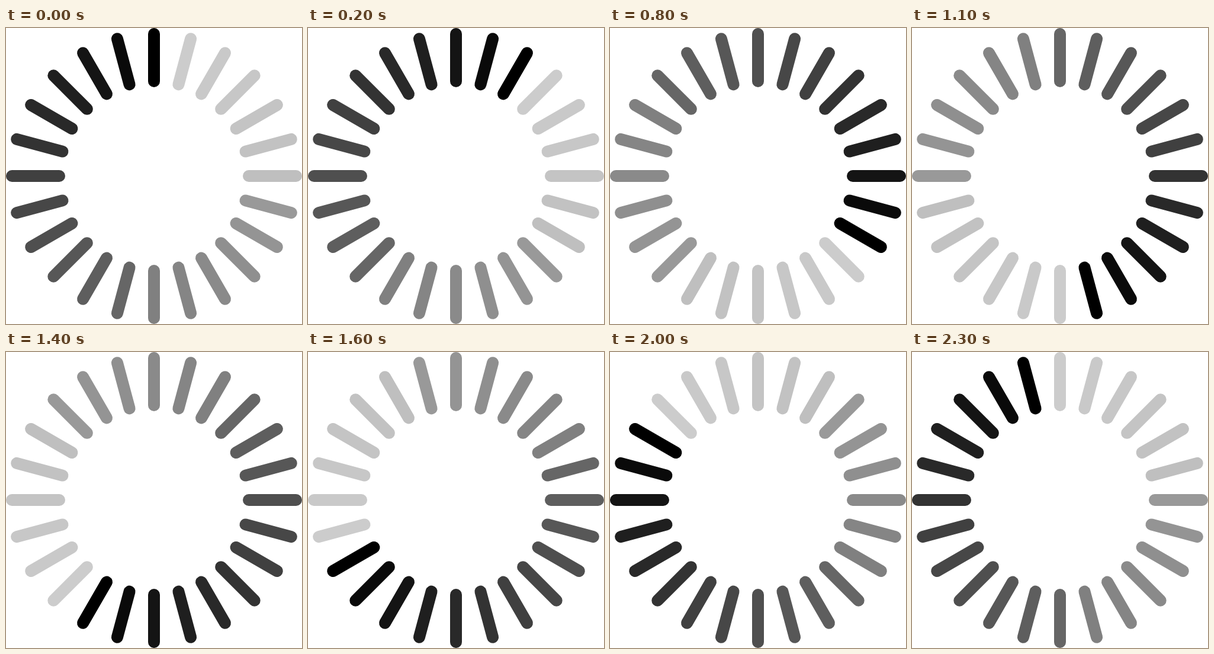
Recreate the animation shown at these times as an HTML page. Size 500 by 500 pixels, loop 2.4 s.

```html
<!DOCTYPE html>
<html lang="en">
<head>
<meta charset="utf-8">
<title>Spinner</title>
<style>
  html, body { margin: 0; width: 100%; height: 100%; overflow: hidden; background: #fff; }
  svg { display: block; width: 100%; height: 100%; }
</style>
</head>
<body>
<svg viewBox="0 0 500 500" stroke-width="20" stroke-linecap="round"></svg>
<script>
const COUNT = 24;
const STEP_MS = 100;
const GROUP = 6;
const svg = document.querySelector('svg');

const spokes = Array.from({ length: COUNT }, (_, i) => {
  const line = document.createElementNS('http://www.w3.org/2000/svg', 'line');
  const attrs = { x1: 250, y1: 10, x2: 250, y2: 90, transform: `rotate(${i * 360 / COUNT} 250 250)` };
  for (const name in attrs) line.setAttribute(name, attrs[name]);
  return svg.appendChild(line);
});

// Four groups of greys: each starts at a quarter step and climbs to a fifth step.
function grey(age) {
  const group = Math.floor(age / GROUP);
  const start = group / 4;
  const end = (group + 1) / 5;
  const level = Math.round(255 * (start + (end - start) * (age % GROUP) / (GROUP - 1)));
  return `rgb(${level},${level},${level})`;
}

function draw(ms) {
  const head = Math.floor(ms / STEP_MS) % COUNT;
  spokes.forEach((spoke, i) => spoke.setAttribute('stroke', grey((head - i + COUNT) % COUNT)));
}

const startTime = performance.now();
function tick() {
  draw(performance.now() - startTime);
  requestAnimationFrame(tick);
}
tick();
</script>
</body>
</html>
```
